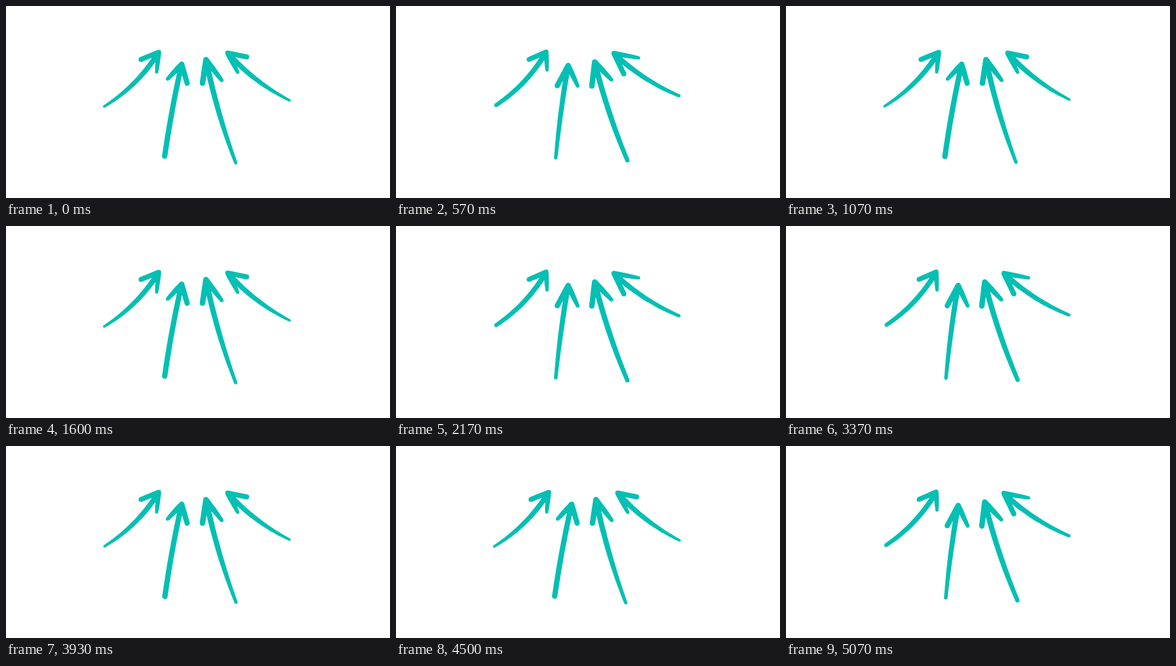
Animation, 600 px wide and 300 px high, one loop 5110 ms. Source, as an HTML page with a canvas:

```html
<!DOCTYPE html>
<html lang="en">
<head>
<meta charset="utf-8">
<title>Four hand-drawn arrows</title>
<style>
html, body { margin: 0; width: 100%; height: 100%; overflow: hidden; background: #fff; }
canvas { display: block; width: 600px; height: 300px; }
</style>
</head>
<body>
<canvas id="stage" width="600" height="300"></canvas>
<script>
const LOOP = 5110;
const CLOCK = 30;        // display ticks per second
const RATE = 12.5;       // drawings per second
const DRIFT = 0.15;      // how far a redrawn tail slips towards the next pose
const COLOR = '#04bfb3';
const ctx = document.getElementById('stage').getContext('2d');

// Key points; the heavy barb keeps its width, the light one tapers.
const arrow = (tail, tip, heavy, light, tailWidth) => ({ tail, tip, heavy, light, tailWidth });

const poseA = [
  arrow([153.5, 157], [238.5, 72.5], [211, 83.5], [235.5, 103], 4),
  arrow([248, 234.5], [274.5, 91], [283, 120.5], [252.5, 114], 8.5),
  arrow([359, 245], [312.5, 84], [307, 120.5], [337, 116], 5),
  arrow([443, 147.5], [346.5, 73.5], [376, 79.5], [362, 103.5], 4)
];
const poseB = [
  arrow([157, 154.5], [234.5, 72], [208, 83.5], [236, 100], 6),
  arrow([250, 237.5], [269, 93], [252, 124.5], [284, 125], 5.5),
  arrow([362, 240.5], [310.5, 87.5], [306, 125], [336.5, 115], 6.5),
  arrow([442, 139], [340.5, 74], [356, 106], [379, 81], 5)
];

// Sideways bow of each shaft, as a share of its length.
const bows = [0.058, -0.01, -0.02, -0.046];

const mix = (a, b, t) => a + (b - a) * t;
const mixPoint = (p, q, t) => [mix(p[0], q[0], t), mix(p[1], q[1], t)];
const easeOut = t => 1 - (1 - t) ** 2;

const redraw = (pose, next) =>
  pose.map((a, i) => ({ ...a, tail: mixPoint(a.tail, next[i].tail, DRIFT) }));

// A bowed brush stroke of changing width, built from overlapping discs.
function brush(path, from, to, w0, w1, bow = 0) {
  const dx = to[0] - from[0], dy = to[1] - from[1];
  const steps = Math.ceil(Math.hypot(dx, dy) * 2);
  for (let s = 0; s <= steps; s++) {
    const t = s / steps;
    const lift = 4 * t * (1 - t) * bow;
    const x = from[0] + dx * t - dy * lift;
    const y = from[1] + dy * t + dx * lift;
    const r = mix(w0, w1, easeOut(t)) / 2;
    path.moveTo(x + r, y);
    path.arc(x, y, r, 0, Math.PI * 2);
  }
}

function build(pose) {
  const path = new Path2D();
  pose.forEach(({ tail, tip, heavy, light, tailWidth }, i) => {
    const length = Math.hypot(tip[0] - tail[0], tip[1] - tail[1]);
    const full = 5.5 + length / 50;
    brush(path, tail, tip, tailWidth, full, bows[i]);
    brush(path, heavy, tip, full * 0.98, full);
    brush(path, light, tip, full * 0.65, full);
  });
  return path;
}

const drawings = [poseA, redraw(poseA, poseB), poseB, redraw(poseB, poseA)].map(build);

// Each drawing appears on the first clock tick after it is due, to the nearest 10 ms.
const startOf = k => Math.round(Math.ceil(k * CLOCK * 10 / (RATE * 10)) * 100 / CLOCK) * 10;

function drawingAt(t) {
  let k = Math.ceil(t * RATE / 1000) + 1;
  while (k > 0 && startOf(k) > t) k--;
  return k % drawings.length;
}

const t0 = performance.now();
function tick() {
  ctx.clearRect(0, 0, 600, 300);
  ctx.fillStyle = COLOR;
  ctx.fill(drawings[drawingAt((performance.now() - t0) % LOOP)]);
  requestAnimationFrame(tick);
}
tick();
</script>
</body>
</html>
```
